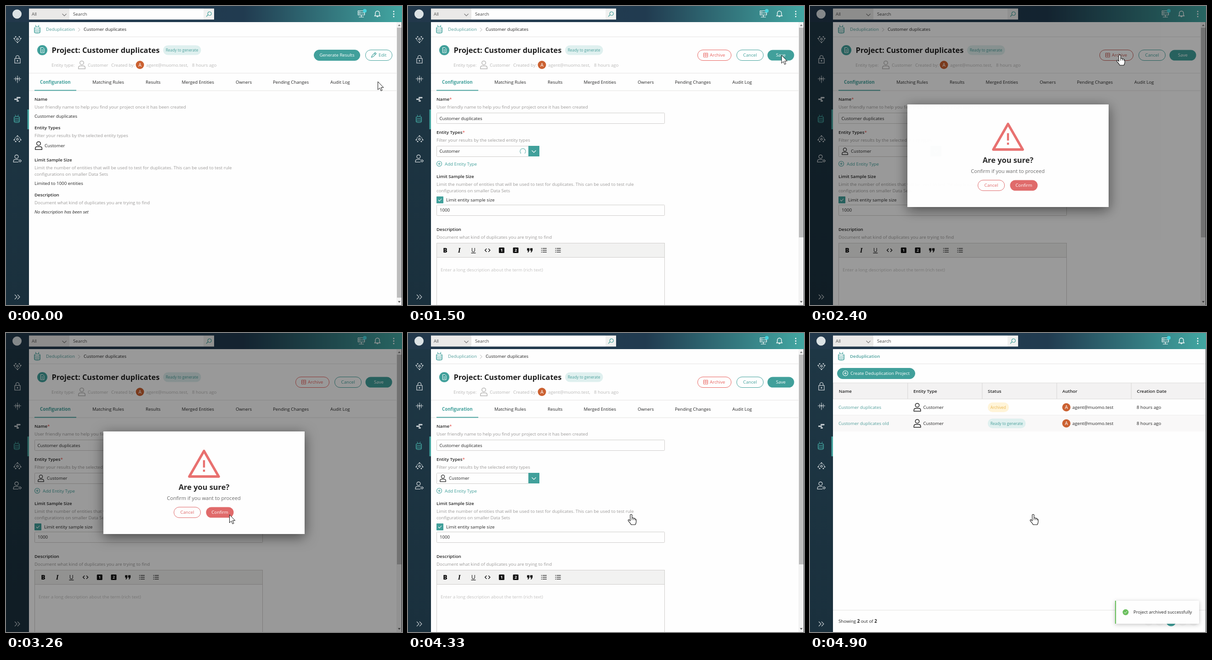
Animation of 862 by 650 pixels, one loop 6 s. Source, as an HTML page:

```html
<!DOCTYPE html>
<html lang="en">
<head>
<meta charset="utf-8">
<title>Archive a project</title>
<style>
html, body { margin: 0; width: 100%; height: 100%; overflow: hidden; background: #fefefe; }
svg { display: block; width: 862px; height: 650px; font-family: "Open Sans", "Noto Sans", sans-serif; }
#modal { filter: drop-shadow(0 6px 14px rgba(0, 0, 0, .55)); }
#toast { filter: drop-shadow(0 2px 5px rgba(0, 0, 0, .22)); }
</style>
</head>
<body>
<svg id="stage" viewBox="0 0 862 650"></svg>
<script>
const TEAL = '#41a09b', RED = '#e8615d', INK = '#242424', HINT = '#9c9a99', PALE = '#b9b8b7',
      LINE = '#e3e2e1', EDGE = '#cfcdcb', LIGHT = '#c9d0d4';
const MAIL = 'agent@muomo.test';

// Drawing helpers; text is centred vertically on c, with its baseline on a whole pixel
const text = (x, c, s, fill = INK, size = 9.7, more = '') =>
  `<text x="${x}" y="${Math.round(c + size * .36)}" font-size="${size}" fill="${fill}" ${more}>${s}</text>`;
const bold = (x, c, s, fill = INK, size = 9.7, weight = 600) =>
  text(x, c, s, fill, size, `font-weight="${weight}"`);
const mid = (x, c, s, fill, size, more = '') => text(x, c, s, fill, size, 'text-anchor="middle" ' + more);
const rect = (x, y, w, h, fill, r = 0, stroke = 'none', more = '') =>
  `<rect x="${x}" y="${y}" width="${w}" height="${h}" rx="${r}" fill="${fill}" stroke="${stroke}" ${more}/>`;
const disc = (x, y, r, fill, stroke = 'none') =>
  `<circle cx="${x}" cy="${y}" r="${r}" fill="${fill}" stroke="${stroke}"/>`;
const line = (d, stroke, w = 1, fill = 'none') =>
  `<path d="${d}" fill="${fill}" stroke="${stroke}" stroke-width="${w}"/>`;
const at = (x, y, s, scale = 1) => `<g transform="translate(${x} ${y}) scale(${scale})">${s}</g>`;
const group = (id, ...parts) => `<g id="${id}">${parts.join('')}</g>`;
const pill = (x, y, w, fill, stroke = fill, more = '') => rect(x + .5, y + .5, w - 1, 23, fill, 11.5, stroke, more);
const field = (x, y, w) => rect(x + .5, y + .5, w - 1, 23, '#fefefe', 1, EDGE);

// Icons, drawn around their own centre
const person = c => line('M-7.3 8.5V6.5Q-7.3 2.2-3.3 2.2H3.3Q7.3 2.2 7.3 6.5V8.5Z', c, 1.5) +
  `<circle cy="-4.4" r="4.2" fill="none" stroke="${c}" stroke-width="1.5"/>`;
const barrel = c => line('M-6-3V5C-6 9 6 9 6 5V-3M-6-3C-6-6 6-6 6-3C6 0-6 0-6-3M-6 0C-6 3.5 6 3.5 6 0' +
  'M-6 3C-6 6.5 6 6.5 6 3M-2-5L-3.5-9M2-5L3.5-9', c, 1.1);
const plus = c => line('M-5.5 0A5.5 5.5 0 1 1 5.5 0A5.5 5.5 0 1 1-5.5 0M-3 0H3M0-3V3', c, 1.1);
const cloud = c => line('M-2.5-1L0-3.5L2.5-1L0 1.5Z', c, 1.2) + line('M-6.5-1.5Q-5.5 3.5-1 5M6.5-1.5Q5.5 3.5 1 5', c) +
  [[-7, -2.5], [7, -2.5], [-4, -6], [4, -6], [0, 6]].map(p => disc(...p, 1.5, c)).join('');
const down = c => line('M-4.5-2L0 2.5L4.5-2', c, 1.1);
const tick = c => line('M-3.5 0L-1 2.5L3.5-2.5', c, 1.1);
const lock = line('M-6-2H6V8H-6ZM-3.5-2V-5A3.5 3.5 0 0 1 3.5-5V-2', LIGHT, 1.3) + disc(0, 3, 1.6, LIGHT);
const fork = line('M-8-1H8M0-8V8M-4-1V-5M4-1V-5M-4-1V4M4-1V4', LIGHT, 1.1) + disc(0, -1, 1.6, LIGHT);
const bars = rect(-2, -4.5, 8.5, 3, LIGHT, 1) + rect(-7, -1, 8, 3, LIGHT, 1) + rect(-2, 2.5, 5, 3, LIGHT, 1);
const gear = at(-2, 0, person(LIGHT), .92) + disc(5.5, 5, 4.5, '#1b3340') +
  `<circle cx="5.5" cy="5" r="2.2" fill="none" stroke="${LIGHT}" stroke-width="2" stroke-dasharray="1.5 .7"/>`;
const bullets = [-4, 0, 4].map(y => rect(-6, y - .7, 1.6, 1.4, '#111') + rect(-3, y - .6, 9, 1.2, '#111')).join('');
const avatar = (x, y) => disc(x, y, 9, '#cb6131') + mid(x, y, 'A', '#fff', 10.5);
const badge = (x, y, w, s, fill, ink) => rect(x, y - 10.5, w, 21, fill, 10.5) + text(x + 5.7, y, s, ink, 8.36);
const ready = (x, y) => badge(x, y, 82.5, 'Ready to generate', '#dff0ef', '#4a9f9b');

const topBar =
  rect(0, 0, 862, 35, 'url(#bar)') + disc(24, 17.5, 10, '#dce2e5') +
  rect(50, 5.5, 88, 24, '#eae9e8') + text(56, 17.5, 'All', '#555') + at(127, 19, down('#777')) +
  rect(138, 5.5, 292, 24, '#fefefe') + text(146, 17.5, 'Search', '#444') +
  rect(430, 5.5, 23, 24, '#f1f1f0') + line('M436 23L440 19M440 19A4 4 0 1 1 443 20.5A4 4 0 0 1 440 19', TEAL, 1.2) +
  line('M766.5 10.5H780.5V15H766.5ZM766.5 15V19.5H780.5V15M773.5 19.5V24M768 24H779M769 12.8H771M769 17.2H771', '#fff', 1.2) +
  line('M802.5 21.5H814.5L813 19V15.5A4.5 4.5 0 0 0 804 15.5V19ZM807 22.5A1.6 1.6 0 0 0 810 22.5', '#fff', 1.3) +
  [12, 17.5, 23].map(y => disc(844, y, 1.4, '#fff')).join('') +
  group('dot', disc(781, 10.5, 4, '#46d3dc'));

const sideBar =
  rect(0, 35, 50, 615, 'url(#side)') + rect(46.5, 225, 3.5, 43, TEAL) +
  [cloud(LIGHT), lock, fork, bars, barrel(TEAL), '<g transform="scale(1 -1)">' + cloud(LIGHT) + '</g>', gear]
    .map((s, i) => at(i == 4 ? 23.5 : 25, 73 + i * 43.1, s)).join('') +
  line('M19 627.5L24 632.5L19 637.5M25 627.5L30 632.5L25 637.5', LIGHT, 1.1);

const tabs = [[188, 'Matching Rules'], [304, 'Results'], [382.5, 'Merged Entities'], [500, 'Owners'],
  [581, 'Pending Changes'], [706, 'Audit Log']];
const project =
  at(68, 51, barrel(TEAL), 1.05) + text(87, 50.5, 'Deduplication', '#539f9c') +
  line('M157 47.5L161 51.5L157 55.5', '#aaa') + text(169, 51, 'Customer duplicates') +
  line('M50 67H850M50 146H850M50 184H850', LINE) +
  disc(79, 96, 11, TEAL) + line('M75.5 90.5H80.5L83 93V101.5H75.5ZM77.5 95.5H81M77.5 98.5H81', '#fff') +
  bold(99.4, 95.7, 'Project: Customer duplicates', '#1f1f1f', 16.35, 700) + ready(342, 96) +
  text(99, 128.5, 'Entity type:', PALE) + at(165, 128, person(PALE)) + text(178, 128.5, 'Customer', PALE) +
  text(229, 128.5, 'Created by:', PALE) + avatar(291.5, 128) + text(305, 128.5, MAIL + ',', PALE) +
  text(405, 128.5, '8 hours ago', PALE) +
  bold(74, 165.5, 'Configuration', TEAL, 9.7, 700) + rect(62, 182.5, 91, 1.8, TEAL) +
  tabs.map(([x, s]) => text(x, 165.5, s)).join('') +
  rect(850, 35, 12, 615, '#f3f3f3') + line('M853 43.5L856 40L859 43.5Z', 'none', 0, '#777') +
  line('M853 641.5L856 645L859 641.5Z', 'none', 0, '#555') + rect(851, 47, 10, 587, '#bdbdbd', 0, 'none', 'id="thumb"');

const sampleHint = y => text(62, y, 'Limit the number of entities that will be used to test for duplicates. This can be used to test rule', HINT) +
  text(62, y + 14, 'configurations on smaller Data Sets', HINT);
const nameHint = text(62, 220, 'User friendly name to help you find your project once it has been created', HINT);
const typeHint = y => text(62, y, 'Filter your results by the selected entity types', HINT);
const noteHint = y => text(62, y, 'Document what kind of duplicates you are trying to find', HINT);
const star = `<tspan fill="${RED}">*</tspan>`;

const view = group('view',
  pill(670, 95, 101, TEAL), mid(720.5, 106.5, 'Generate Results', '#fff', 9.6),
  pill(782, 95, 59, '#fefefe', TEAL, 'id="edit"'),
  line('M795.5 111.5L797 107.5L803.5 101L806 103.5L799.5 110ZM801.5 103L804 105.5', TEAL, 1.1),
  text(811, 106.5, 'Edit', TEAL),
  bold(62, 203, 'Name'), nameHint, text(62, 239.5, 'Customer duplicates'),
  bold(62, 265, 'Entity Types'), typeHint(282), at(71, 303.5, person(INK)), text(84, 304, 'Customer'),
  bold(62, 335, 'Limit Sample Size'), sampleHint(352), text(62, 385.5, 'Limited to 1000 entities'),
  bold(62, 411, 'Description'), noteHint(428),
  text(62, 448, 'No description has been set', INK, 9.7, 'font-style="italic"'));

const tools = [mid(0, 0, 'B', '#111', 14, 'font-weight="800"'),
  mid(0, 0, 'I', '#111', 15, 'font-weight="700" font-style="italic" font-family="Liberation Serif, serif"'),
  mid(0, -.5, 'U', '#111', 12.5) + rect(-5, 5.4, 10, 1.2, '#111'),
  line('M-2-3.5L-5.5 0L-2 3.5M2-3.5L5.5 0L2 3.5', '#111', 1.4),
  ...[1, 2].map(n => rect(-6, -6, 12, 12, '#111', 1.5) + mid(0, 0, n, '#fff', 9, 'font-weight="700"')),
  line('M-6-4.5H-.8V0L-3 4.5H-5L-3.5 .7H-6ZM.8-4.5H6V0L3.8 4.5H1.8L3.3 .7H.8Z', 'none', 0, '#111'), bullets, bullets];

const form = group('form',
  group('archive', pill(630, 95, 74, 'none', 'currentColor'),
    line('M643.5 102.5H652.5V111H643.5ZM643.5 106.5H652.5M646.5 104.5H649.5M646.5 108.7H649.5', 'currentColor'),
    text(657, 106.5, 'Archive', 'currentColor')),
  pill(715, 95, 59, '#fefefe', TEAL, 'id="cancel"'), mid(744.5, 106.5, 'Cancel', TEAL),
  pill(782, 95, 59, TEAL, 'none', 'id="save"'), mid(811.5, 106.5, 'Save', '#fff'),
  bold(62, 203, 'Name' + star), nameHint, field(62, 232, 497), text(68.5, 244.5, 'Customer duplicates'),
  bold(62, 275, 'Entity Types' + star), typeHint(291.5), field(62, 304, 201), rect(262, 304, 24, 23, TEAL),
  at(274, 316, down('#fff')),
  group('loading', text(68.5, 316, 'Customer'),
    `<path id="spinner" d="M4.2-4.2A6 6 0 1 1-4.2-4.2" fill="none" stroke="${TEAL}" stroke-width="1.3" stroke-dasharray="2 .9"/>`),
  group('loaded', at(76, 316, person(INK), .85), text(89, 316, 'Customer')),
  at(68, 343, plus(TEAL)), text(80, 343.5, 'Add Entity Type', TEAL),
  bold(62, 371, 'Limit Sample Size'), sampleHint(388), rect(62, 414, 15, 15, TEAL, 1), at(69.5, 421.5, tick('#fff')),
  text(83, 421.5, 'Limit entity sample size'), field(62, 432, 497), text(69, 443.5, '1000'),
  bold(62, 486, 'Description'), noteHint(503),
  rect(62.5, 515.5, 496, 150, '#fefefe', 0, EDGE), rect(62.5, 515.5, 496, 31, '#f2f2f1', 0, EDGE),
  tools.map((s, i) => at(81 + i * 30.7, 531, s)).join(''),
  text(71, 574, 'Enter a long description about the term (rich text)', '#c3c2c1'));

const heads = ['Name', 'Entity Type', 'Status', 'Author', 'Creation Date'];
const row = (y, name, status) => text(62, y, name, '#539f9c') + at(233.5, y, person(INK)) +
  text(246.5, y, 'Customer') + status + avatar(558, y) + text(571, y, MAIL) + text(711, y, '8 hours ago');
const two = '<tspan font-weight="700">2</tspan>';
const list = group('list',
  rect(50, 35, 812, 615, '#fefefe'), at(68, 51, barrel(TEAL), 1.05), bold(87, 50.5, 'Deduplication', '#4a9f9b'),
  line('M50 67H862M50 602.5H862', LINE),
  pill(59, 76, 170, TEAL), at(77, 87.5, plus('#fff')), text(88, 87.5, 'Create Deduplication Project', '#fff'),
  rect(50.5, 108.5, 812, 35, '#f3f2f2', 0, '#dcdbda'),
  heads.map((s, i) => bold(62.7 + i * 162.2, 126.5, s) + (i ? line(`M${50.5 + i * 162.2} 109V143`, '#d6d5d4') : '')).join(''),
  group('rows',
    rect(50, 179, 812, 35, '#f9f8f8'), line('M50 178.5H862', '#ededec'),
    row(161.5, 'Customer duplicates', badge(387, 161.5, 46, 'Archived', '#fff4d8', '#e9b54e')),
    row(196.5, 'Customer duplicates old', ready(387, 196.5)),
    text(62, 627, `Showing ${two} out of ${two}`),
    [737, 761, 811, 835].map(x => disc(x, 626.5, 10, '#f8f8f8')).join(''), disc(786, 626.5, 11, TEAL), mid(786, 626.5, '1', '#fff')),
  group('toast', rect(664, 582, 183, 50, '#fefefe', 2), rect(664, 582, 2.2, 50, '#6bbf5e'),
    disc(687, 607, 6.5, '#6bbf5e'), at(687, 607, tick('#fff'), .9), text(704, 607, 'Project archived successfully', INK, 9.65)));

const status = group('status', line('M0 634.5H282Q286 634.5 286 638.5V650H0Z', '#c3d4ee', .6, '#d3e3fd'),
  text(4, 642.5, 'Waiting for hub.stagingone.brixtal-demo.sample...', '#45484d', 8.2));

const modal = group('modal', rect(212, 214, 438, 223, '#fefefe')) + group('ask',
  `<path d="M431 256.5L463 312H399Z" fill="none" stroke="#e8706f" stroke-width="5.5" stroke-linejoin="round"/>`,
  rect(428.8, 276.5, 4.4, 16, '#e8706f'), rect(428.8, 297, 4.4, 4.6, '#e8706f'),
  mid(431, 335.5, 'Are you sure?', '#292929', 16.4, 'font-weight="700"'),
  mid(430.5, 359.5, 'Confirm if you want to proceed', '#6a6a6a', 11.1),
  pill(365, 378, 59, '#fefefe', '#e0696a'), mid(394.5, 390, 'Cancel', '#e0696a'),
  pill(435, 378, 61, '#e06a6a', 'none', 'id="confirm"'), mid(465.5, 390, 'Confirm', '#fff'));

const pointer = group('pointer',
  `<path id="arrow" d="M0 0V17.5L4 13.7L6.7 20L9.4 18.8L6.8 12.7H12.3Z" fill="#fff" stroke="#111"/>`,
  group('hand', at(-.8, -.8,
    line('M-2 14V2A2 2 0 0 1 2 2V8.5Q2.5 7.5 4 7.5T6 9.5Q6.3 8.5 7.7 8.6T9.3 10.6Q11 10.4 11 12.5V16' +
      'Q11 19 9 22.5H0Q-1 20-5.5 15.2Q-7.3 12.8-5.8 11.8Q-4.3 11.2-2 14Z', '#111', 1.1, '#fff') +
    line('M2 8.5V12.5M6 9.5V12.5M9.3 10.6V13', '#111'))));

document.getElementById('stage').innerHTML = `<defs>
  <linearGradient id="bar" gradientUnits="userSpaceOnUse" x1="0" x2="862">
    <stop stop-color="#22384b"/><stop offset=".6" stop-color="#213b50"/><stop offset="1" stop-color="#42a7a2"/>
  </linearGradient>
  <linearGradient id="side" x2="0" y2="1"><stop stop-color="#1e3745"/><stop offset="1" stop-color="#1a303d"/></linearGradient>
  </defs>` + rect(0, 0, 862, 650, '#fefefe') + project + view + form + list + topBar + sideBar +
  rect(861, 35, 1, 615, '#4a4d50') + status +
  group('dialog', rect(0, 0, 862, 650, 'rgba(0,0,0,.4)'), modal) + pointer;

const el = {};
document.querySelectorAll('[id]').forEach(e => el[e.id] = e);
const show = (id, on) => el[id].style.display = on ? '' : 'none';
const clamp = v => Math.min(1, Math.max(0, v));

// Pointer stops: time, x, y
const stops = [[0, 809.5, 164.5], [130, 809.5, 164.5], [620, 815, 107], [1460, 815, 107], [2060, 675, 107],
  [2600, 675, 107], [3220, 488, 393.5], [3260, 486.5, 395], [6000, 486.5, 395]];
function place(t) {
  const i = stops.findIndex(s => s[0] > t), [t0, x0, y0] = stops[i - 1], [t1, x1, y1] = stops[i];
  const u = (t - t0) / (t1 - t0), k = u * u * (3 - 2 * u);
  return [x0 + (x1 - x0) * k, y0 + (y1 - y0) * k];
}

function draw(now) {
  const t = now % 6000, [x, y] = place(t);
  const editing = t >= 830, listing = t >= 4400, waiting = t < 1800;
  const overCancel = t < 2600 && x > 715 && x < 774, overArchive = t < 2600 && x < 704;
  const hand = t < 1430 ? y < 118 : overCancel || overArchive || t >= 3730;

  show('view', !editing);
  show('form', editing && !listing);
  show('list', listing);
  show('rows', t >= 4630);
  show('toast', t >= 4630);
  el.toast.setAttribute('transform', `translate(${200 * (1 - clamp((t - 4630) / 260)) ** 3} 0)`);
  show('dot', !(t >= 830 && t < 1230 || t >= 4400 && t < 4700));
  show('status', t >= 730 && t < 1330 || t >= 4430 && t < 4700);
  el.thumb.setAttribute('height', editing ? 456 : 587);

  show('loading', waiting);
  show('loaded', !waiting);
  el.spinner.setAttribute('transform', `translate(250 316) rotate(${t * .36 % 360})`);

  el.edit.setAttribute('fill', hand ? '#e6f3f2' : '#fefefe');
  el.save.setAttribute('fill', t < 1430 ? '#3b8884' : TEAL);
  el.cancel.setAttribute('fill', overCancel ? '#e6f3f2' : '#fefefe');
  el.archive.setAttribute('color', overArchive && t < 2460 ? '#c2564f' : RED);
  el.confirm.setAttribute('fill', t >= 3730 && t < 4160 ? '#d25f60' : '#e06a6a');

  show('dialog', t >= 2260 && t < 4330);
  el.dialog.style.opacity = 1 - (1 - clamp((t - 2230) / 220)) ** 3;

  el.pointer.setAttribute('transform', `translate(${x} ${y})`);
  show('arrow', !hand);
  show('hand', hand);
  requestAnimationFrame(draw);
}
requestAnimationFrame(draw);
</script>
</body>
</html>
```
